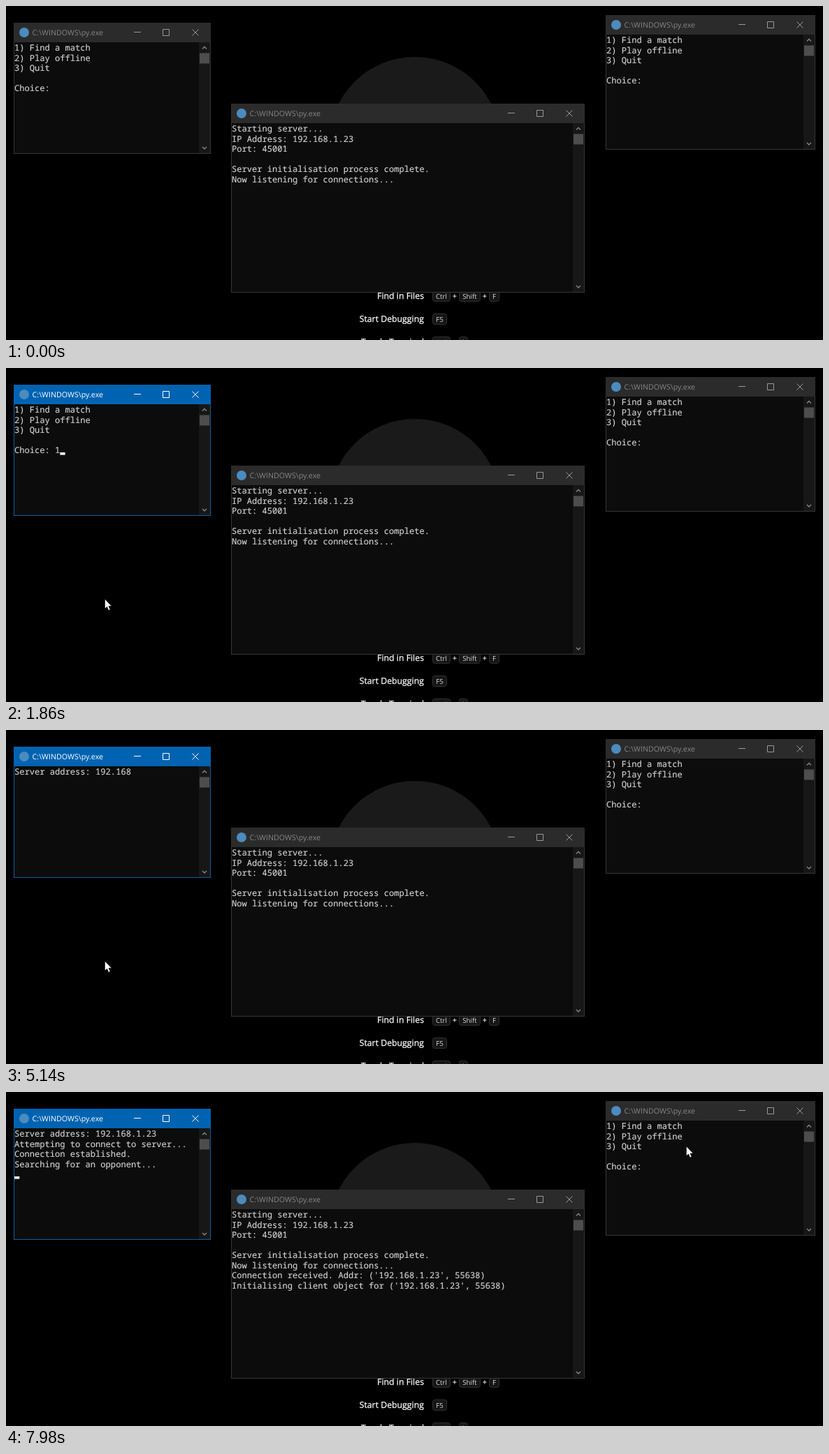
Write an HTML page that moves like this. It is 1169x479 px and loops after 8 s.

```html
<!DOCTYPE html>
<html lang="en">
<head>
<meta charset="utf-8">
<title>Match server demo</title>
<style>
  html, body { margin: 0; width: 100%; height: 100%; overflow: hidden; background: #000; }
  svg { display: block; width: 1169px; height: 479px; }
  text { text-rendering: geometricPrecision; white-space: pre; }
  .mono { font: 12.1px "Noto Sans Mono", monospace; fill: #d2d2d2; stroke: #d2d2d2; stroke-width: .15; }
  .title { font: 10.7px "Open Sans", sans-serif; fill: #858585; }
  .bar { fill: #2b2b2b; }
  .frame { fill: none; stroke: #363636; }
  .icons { fill: none; stroke: #999; }
  .active .bar { fill: #0063b1; }
  .active .frame { stroke: #0f5f9f; }
  .active .icons { stroke: #fff; }
  .active .title { fill: #fff; }
  .arrows { fill: none; stroke: #858585; stroke-width: 1.4; }
  .hint { font: 12.3px "Open Sans", sans-serif; fill: #fff; stroke: #fff; stroke-width: .25; text-anchor: end; }
  .plus { font: 600 11px "Open Sans", sans-serif; fill: #eee; text-anchor: middle; }
  .key rect { fill: #161616; stroke: #303030; }
  .key text { font: 9.8px "Open Sans", sans-serif; fill: #d8d8d8; text-anchor: middle; }
</style>
</head>
<body>
<svg id="stage" viewBox="0 0 1169 479"></svg>
<script>
const LOOP = 8000, CHAR = 7.26, LINE = 14.5;
const stage = document.getElementById('stage');

const MENU = '1) Find a match\n2) Play offline\n3) Quit\n\nChoice: ';
const BOOT = 'Starting server...\nIP Address: 192.168.1.23\nPort: 45001\n\n' +
  'Server initialisation process complete.\nNow listening for connections...';
const JOINED = BOOT + "\nConnection received. Addr: ('192.168.1.23', 55638)" +
  "\nInitialising client object for ('192.168.1.23', 55638)";
const ASK = 'Server address: ';
const DONE = ASK + '192.168.1.23\nAttempting to connect to server...\n' +
  'Connection established.\nSearching for an opponent...\n';

const lines = (text, x, y) => text.split('\n')
  .map((s, i) => `<tspan x="${x}" y="${y + i * LINE}">${s}</tspan>`).join('');

function windowBox(id, x, y, w, h) {
  const r = x + w, b = y + h, cy = y + 14;
  return `<g id="${id}">
    <rect x="${x}" y="${y}" width="${w}" height="${h}" fill="#0c0c0c"/>
    <rect x="${r - 17}" y="${y + 28}" width="16" height="${h - 29}" fill="#171717"/>
    <rect x="${r - 16}" y="${y + 43.5}" width="14" height="15" fill="#4d4d4d"/>
    <path class="arrows" d="M${r - 12} ${y + 37.5}l3-3l3 3M${r - 12} ${b - 10}l3 3l3-3"/>
    <rect class="frame" x="${x + .5}" y="${y + .5}" width="${w - 1}" height="${h - 1}"/>
    <rect class="bar" x="${x}" y="${y}" width="${w}" height="28"/>
    <circle cx="${x + 15}" cy="${cy}" r="7" fill="#4b8bbe"/>
    <text class="title" x="${x + 26.6}" y="${y + 18}">C:\\WINDOWS\\py.exe</text>
    <path class="icons" d="M${r - 110} ${cy - .5}h10M${r - 68.5} ${cy - 4.5}h9v9h-9z
      M${r - 26.5} ${cy - 4.5}l9 9m0-9l-9 9"/>
    <text class="mono"></text>
  </g>`;
}

const key = (x, y, w, label) => `<g class="key">
  <rect x="${x + .5}" y="${y + .5}" width="${w - 1}" height="15" rx="3"/>
  <text x="${x + w / 2}" y="${y + 11.5}">${label}</text></g>`;
const hint = (y, label) => `<text class="hint" x="598" y="${y}">${label}</text>`;
const plus = (x, y) => `<text class="plus" x="${x}" y="${y}">+</text>`;

stage.innerHTML = `
  <circle cx="585" cy="195" r="122" fill="#1a1a1a"/>
  ${hint(420.3, 'Find in Files')}${key(610, 408, 26, 'Ctrl')}${plus(642, 420)}
  ${key(648, 408, 31, 'Shift')}${plus(685, 420)}${key(691, 408, 15, 'F')}
  ${hint(453, 'Start Debugging')}${key(610, 441, 21, 'F5')}
  ${hint(485.8, 'Toggle Terminal')}${key(610, 474, 26, 'Ctrl')}${plus(642, 486)}
  ${key(648, 474, 13, '`')}
  ${windowBox('player', 11, 24, 282, 188)}
  ${windowBox('rival', 858, 13, 300, 193)}
  ${windowBox('server', 322, 140, 506, 271)}
  <rect id="caret" width="7.3" height="3.7" fill="#f2f2f2"/>
  <circle id="click" cx="195" cy="163" r="11" fill="#808000"/>
  <path id="pointer" d="M0 0V13.6L3.1 10.9L5.3 16L7.5 15L5.4 10.1H9.6z"
    fill="#fff" stroke="#000" stroke-width=".5"/>`;

const [player, rival, server, caret, click, pointer] =
  ['player', 'rival', 'server', 'caret', 'click', 'pointer'].map(id => document.getElementById(id));
const playerText = player.querySelector('.mono');
const serverText = server.querySelector('.mono');
rival.querySelector('.mono').innerHTML = lines(MENU, 859, 53);

// [start, player console text, caret shown]
const states = [
  [0, MENU, 0], [1510, MENU, 1], [1860, MENU + '1', 1], [2010, MENU + '1\n', 1],
  [2080, '', 1], [2160, ASK, 1], [3060, ASK, 0], [3550, ASK, 1],
  [3630, ASK + '1', 1], [3720, ASK + '19', 1], [3800, ASK + '192', 1],
  [4090, ASK + '192', 0], [4340, ASK + '192.', 1], [4580, ASK + '192.', 0],
  [4630, ASK + '192.1', 1], [4680, ASK + '192.16', 1], [4830, ASK + '192.168', 1],
  [5140, ASK + '192.168', 0], [5660, ASK + '192.168', 1], [5740, ASK + '192.168.', 1],
  [5920, ASK + '192.168.1', 1], [6040, ASK + '192.168.1.', 1],
  [6160, ASK + '192.168.1.2', 1], [6360, ASK + '192.168.1.23', 1],
  [6570, DONE, 1], [7210, DONE, 0], [7740, DONE, 1]
];

const inOut = u => u * u * (3 - 2 * u);
const easeIn = u => u ** 1.8;
const glide = u => .65 * u + 1.6 * u * u - 1.25 * u ** 3;

// [start, end, from, to, easing]
const moves = [
  [370, 890, [650, 440], [195, 163.5], inOut],
  [1200, 1290, [195, 163.5], [202.5, 178], inOut],
  [1430, 1570, [202.5, 178], [141.5, 331.5], inOut],
  [7190, 7510, [141.5, 331.5], [286, 249], easeIn],
  [7510, 7980, [286, 249], [973.5, 78], glide]
];

function pointerAt(t) {
  const [start, end, a, b, ease] = moves.findLast(m => t >= m[0]) || moves[0];
  const k = ease(Math.min(1, Math.max(0, (t - start) / (end - start))));
  return a.map((v, i) => v + (b[i] - v) * k);
}

const show = (el, on) => el.setAttribute('visibility', on ? 'visible' : 'hidden');
let shown;

function draw() {
  const t = performance.now() % LOOP;
  const state = states.findLast(s => t >= s[0]);
  if (state !== shown) {
    shown = state;
    const rows = state[1].split('\n');
    playerText.innerHTML = lines(state[1], 12, 64);
    serverText.innerHTML = lines(state[1] === DONE ? JOINED : BOOT, 323, 180.3);
    caret.setAttribute('x', 12 + rows.at(-1).length * CHAR);
    caret.setAttribute('y', 63 + (rows.length - 1) * LINE);
    show(caret, state[2]);
  }
  player.classList.toggle('active', t >= 920);
  show(click, t >= 890 && t < 1020);
  show(pointer, t >= 390);
  pointer.setAttribute('transform', `translate(${pointerAt(t)})`);
  requestAnimationFrame(draw);
}
draw();
</script>
</body>
</html>
```
